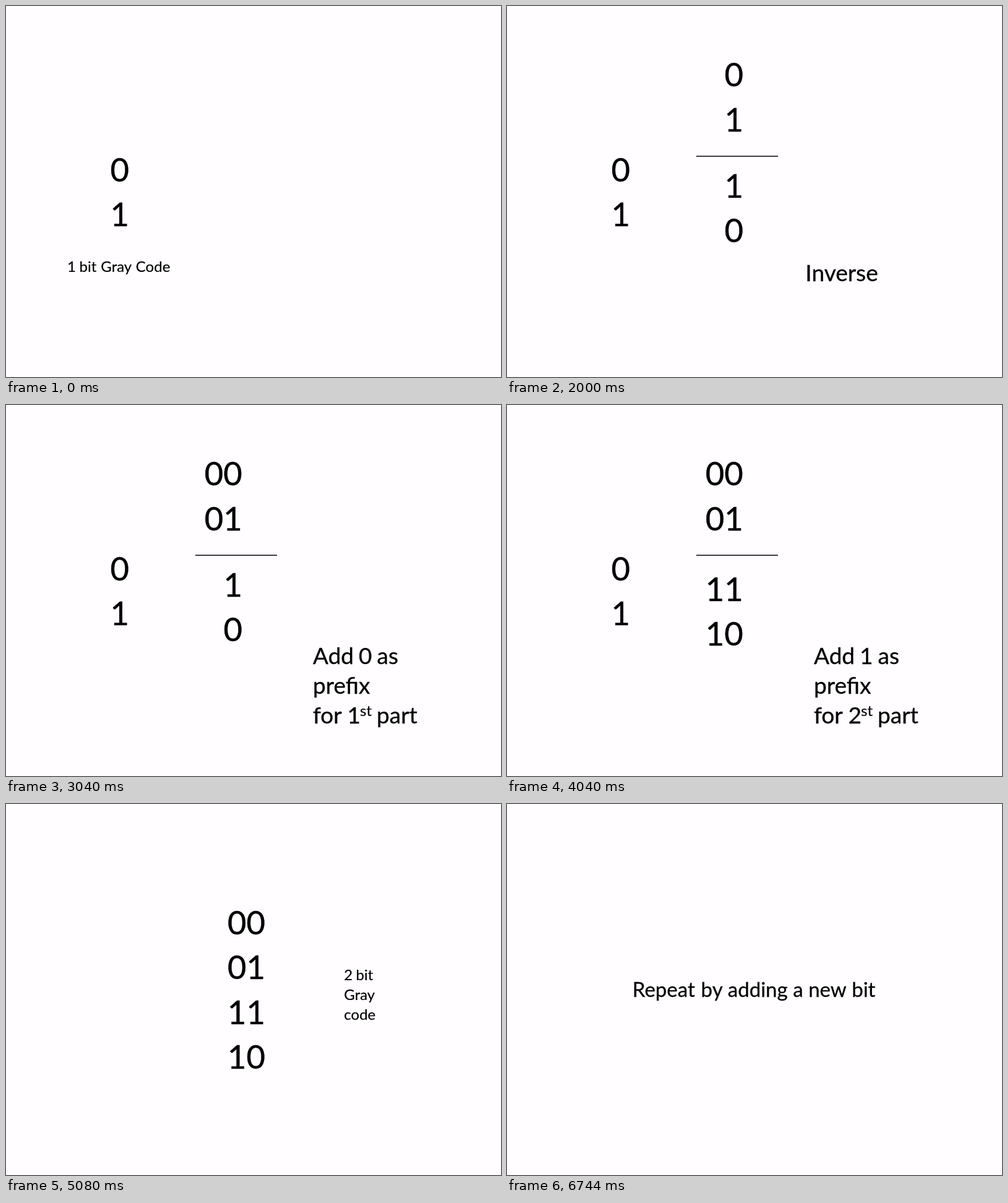
Animation of 800 by 600 pixels, one loop 7160 ms. Source, as an HTML page with a canvas:

```html
<!DOCTYPE html>
<html lang="en">
<head>
<meta charset="utf-8">
<title>Gray code construction</title>
<style>
  html, body { margin: 0; width: 100%; height: 100%; overflow: hidden; background: #fffdff; }
  canvas { display: block; }
</style>
</head>
<body>
<canvas id="stage" width="800" height="600"></canvas>
<script>
const ctx = document.getElementById('stage').getContext('2d');
const DIGIT = 52.6, LARGE = 37, MEDIUM = 33, SMALL = 24;

// Draws words on one baseline; placed alternates word and x position.
// A hairline outline gives the letters slightly heavier stems.
function words(size, y, ...placed) {
  ctx.font = `${size}px Lato, sans-serif`;
  ctx.lineWidth = size * 0.008;
  for (let i = 0; i < placed.length; i += 2) {
    ctx.fillText(placed[i], placed[i + 1], y);
    ctx.strokeText(placed[i], placed[i + 1], y);
  }
}

function column(x, y, ...codes) {
  codes.forEach((code, i) => words(DIGIT, Math.round(y + i * 72.4), code, x));
}

function path(...points) {
  ctx.lineWidth = 1.7;
  ctx.beginPath();
  points.forEach(([x, y]) => ctx.lineTo(x, y));
  ctx.stroke();
}

const oneBit = () => column(168.6, 283.7, '0', '1');
const divider = () => path([306, 243], [438, 243]);

function prefixNote(bit, part) {
  words(LARGE, 419, 'Add', 496, bit, 570, 'as', 599.5);
  words(LARGE, 467, 'prefix', 496);
  words(LARGE, 515, 'for', 496, part, 551.5, 'part', 599);
  words(SMALL, 503, 'st', 572);
}

const scenes = [
  [1000, () => {
    oneBit();
    words(SMALL, 430, '1', 99, 'bit', 118.5, 'Gray', 153.3, 'Code', 209.8);
  }],
  [1000, () => {
    oneBit();
    column(351.6, 130.3, '0', '1');
    path([230, 231], [330, 147.7]);
    path([321, 149], [330, 147.7], [327.2, 156.4]);
    words(LARGE, 393, 'Copy', 445.3);
  }],
  [1040, () => {
    oneBit();
    column(351.6, 130.3, '0', '1');
    divider();
    column(351.6, 310, '1', '0');
    words(LARGE, 445, 'Inverse', 482.3);
  }],
  [1000, () => {
    oneBit();
    column(320.7, 130.3, '00', '01');
    divider();
    column(351.6, 310, '1', '0');
    prefixNote('0', '1');
  }],
  [1040, () => {
    oneBit();
    column(320.7, 130.3, '00', '01');
    divider();
    column(320.7, 316.5, '11', '10');
    prefixNote('1', '2');
  }],
  [1040, () => {
    column(358, 211, '00', '01', '11', '10');
    words(SMALL, 285, '2', 546.3, 'bit', 565.6);
    words(SMALL, 317, 'Gray', 546.3);
    words(SMALL, 349, 'code', 546.3);
  }],
  [1040, () => words(MEDIUM, 312, 'Repeat', 202.8, 'by', 313.6, 'adding', 356.8,
    'a', 462.2, 'new', 487.2, 'bit', 557.2)]
];
const loop = scenes.reduce((sum, [duration]) => sum + duration, 0);

function sceneAt(time) {
  for (const [duration, draw] of scenes) {
    if (time < duration) return draw;
    time -= duration;
  }
}

let start;
function render(now) {
  start ??= now;
  ctx.fillStyle = '#fffdff';
  ctx.fillRect(0, 0, 800, 600);
  ctx.fillStyle = ctx.strokeStyle = '#000';
  sceneAt((now - start) % loop)();
  requestAnimationFrame(render);
}
requestAnimationFrame(render);
</script>
</body>
</html>
```
